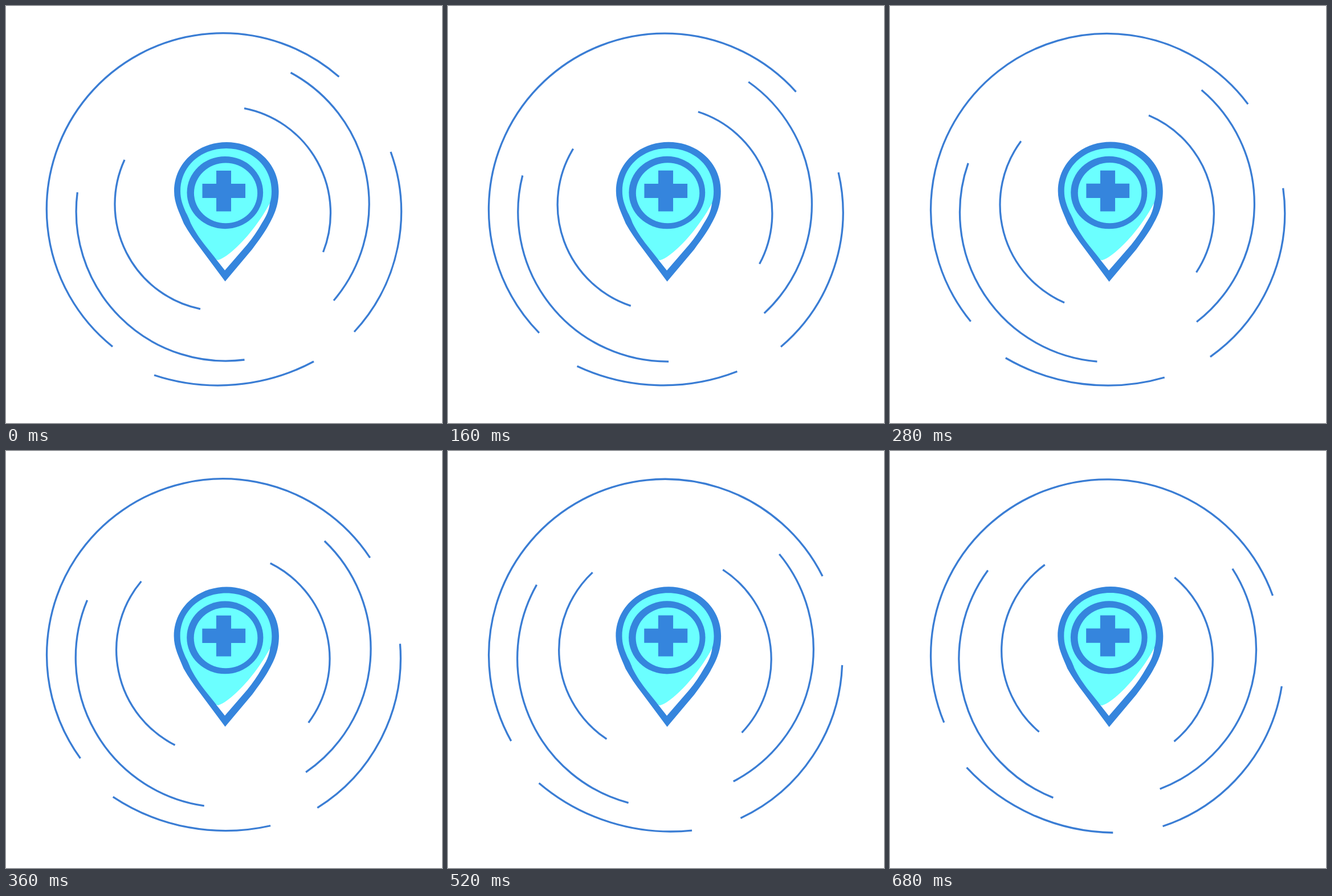
An HTML page for the animation above (720 ms loop, 765 px wide and 732 px high).

```html
<!DOCTYPE html>
<html lang="en">
<head>
<meta charset="utf-8">
<title>Clinic locator</title>
<style>
  html, body { margin: 0; width: 100%; height: 100%; overflow: hidden; background: #fff; }
  svg { display: block; width: 100vw; height: 100vh; }
  #arcs { fill: none; stroke: #3a7dd4; stroke-width: 3.3; }
  .blue { fill: #3585dd; }
  .cyan { fill: #6bffff; }
  .white { fill: #fff; }
</style>
</head>
<body>
<svg viewBox="0 0 765 732">
  <g id="arcs">
    <!-- outer ring -->
    <path d="M187 598A309.2 309.2 0 1 1 584.3 124.3"/>
    <path d="M675 256A310 310 0 0 1 611 572"/>
    <path d="M540 624A357 357 0 0 1 260 648"/>
    <!-- middle ring -->
    <path d="M499.5 117A262 262 0 0 1 575 517"/>
    <path d="M418.5 621A262.5 262.5 0 0 1 125.3 327"/>
    <!-- inner ring -->
    <path d="M418 179.6A187.3 187.3 0 0 1 556.5 432"/>
    <path d="M341 531.8A187.5 187.5 0 0 1 208 270"/>
  </g>
  <g id="pin">
    <path class="blue" d="M295 325C295 276 336 239 387 239S478.5 276 478.5 325C478.5 352 469 370 460 386C452 400 443 412 432 427L384.5 483.5L341 425C330 411 320 396 312 382C304 362 295 346 295 325Z"/>
    <path class="white" d="M463 346C461 361 456 370 449 381C441 395 433 407 423 419L384 464L369 445Z"/>
    <path class="cyan" d="M306 325C306 282 341 250 386.5 250S466 282 466 325C466 333 465 340 463 346C449 373 425 405 404 424C392 435 382 443 372 446Q369 446 366 441L350 421C339 407 331 395 324 381C320 370 318 367 315 361C310 349 306 339 306 325Z"/>
    <ellipse class="blue" cx="384.3" cy="327.6" rx="66.8" ry="63.6"/>
    <ellipse class="cyan" cx="385.5" cy="328.3" rx="55.6" ry="52.9"/>
    <path class="blue" d="M369 289H395V312H420V337H395V360.5H369V337H344.5V312H369Z"/>
  </g>
</svg>
<script>
  const LOOP = 720, STEP = 40;
  const arcs = document.getElementById('arcs');
  const pin = document.getElementById('pin');

  function draw() {
    const step = Math.floor(performance.now() % LOOP / STEP);
    arcs.setAttribute('transform', `rotate(${step * 1.7} 376.4 358.4)`);
    const scale = 1 + step * 0.0005;
    pin.setAttribute('transform', `translate(386 361) scale(${scale}) translate(-386 -361)`);
    requestAnimationFrame(draw);
  }
  draw();
</script>
</body>
</html>
```
